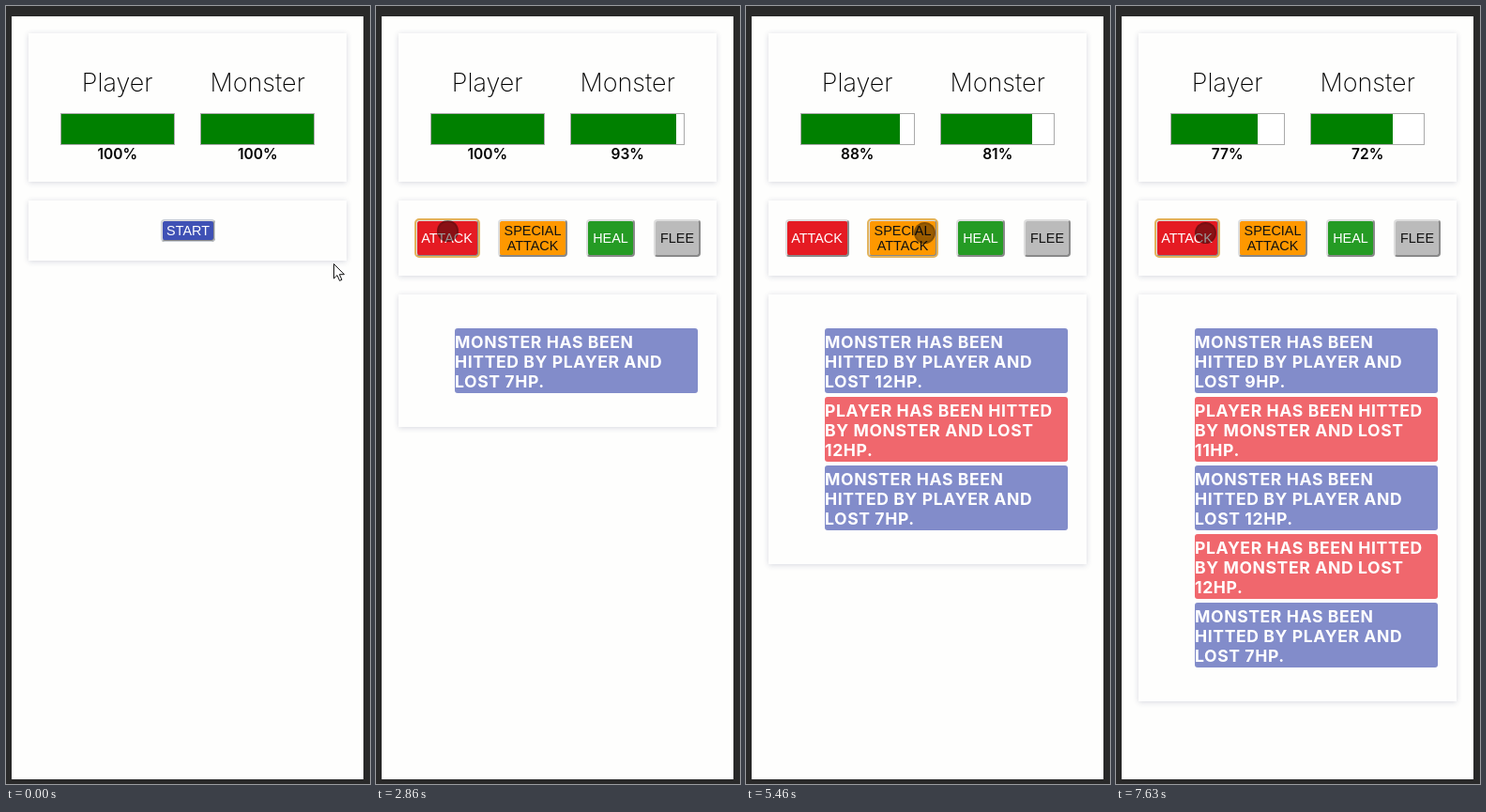
These frames come from a looping animation (388x828 px, 8000 ms). An HTML page:

```html
<!DOCTYPE html>
<html lang="en">
<head>
<meta charset="utf-8">
<style>
  html, body { margin: 0; width: 100%; height: 100%; overflow: hidden; background: #292929; }
  body { position: relative; font-family: Inter, sans-serif; color: #000; }
  div, button, svg { position: absolute; box-sizing: border-box; white-space: nowrap; }
  #page { left: 6px; top: 11px; width: 375px; height: 812px; background: #fefefd; }
  .card { left: 24px; width: 339px; background: #fefefd; box-shadow: 0 1px 6px rgba(40, 45, 90, .18); }
  .fighter { top: 62px; width: 122px; height: 110px; text-align: center; }
  .name { width: 100%; font-size: 27px; font-weight: 200; line-height: 39px; }
  .bar { top: 52px; width: 122px; height: 34px; border: 1px solid #aaa; background: #fff; }
  .fill { height: 100%; background: #008000; }
  .percent { top: 86px; width: 100%; font-size: 15.5px; font-weight: 600; line-height: 19px; }
  button {
    top: 227px; height: 40px; padding: 0; border: 2px outset #ddd; border-radius: 4px;
    font: 14.4px/16px "Liberation Sans", Arial, sans-serif; color: #fff;
  }
  button.focus { outline: 2px solid #e3b45c; outline-offset: -1px; }
  #start { left: 165px; width: 58px; height: 24px; background: #3f51b5; }
  #start.focus { outline: 1px solid #c9cfd6; }
  #attack { left: 41.5px; width: 68px; background: #e51b23; }
  #special { left: 130px; width: 74px; background: #ff9800; color: #111; }
  #heal { left: 224px; width: 52px; background: #259b24; }
  #flee { left: 296px; width: 50px; background: #bbb; color: #111; }
  .entry {
    left: 60px; width: 259px; height: 69px; padding: 4px 0 2px; border-radius: 3px;
    color: #fff; font-size: 17.6px; font-weight: 700; line-height: 21px; letter-spacing: .6px;
  }
  .monster { background: #828cca; }
  .player { background: #f0676d; }
  #touch {
    left: -11.5px; top: -11.5px; width: 23px; height: 23px; border-radius: 50%;
    background: rgba(0, 0, 0, .4); border: 2px solid rgba(0, 0, 0, .12);
  }
  #arrow { left: 348px; top: 273px; }
</style>
</head>
<body>
<div id="page"></div>
<div class="card" style="top:29px;height:158px"></div>
<div class="card" id="controls" style="top:207px"></div>
<div class="card" id="log" style="top:307px"></div>

<div class="fighter" style="left:57.7px">
  <div class="name">Player</div><div class="bar"><div class="fill"></div></div><div class="percent"></div>
</div>
<div class="fighter" style="left:207.2px">
  <div class="name">Monster</div><div class="bar"><div class="fill"></div></div><div class="percent"></div>
</div>

<button id="start">START</button>
<button id="attack" class="game">ATTACK</button>
<button id="special" class="game">SPECIAL<br>ATTACK</button>
<button id="heal" class="game">HEAL</button>
<button id="flee" class="game">FLEE</button>

<div id="touch"></div>
<svg id="arrow" width="14" height="21"><path d="M1.5 1.5V17L5 13.6 7.6 19.4 10 18.3 7.4 12.7H12.5Z" fill="#fff" stroke="#111"/></svg>

<script>
const LOOP = 8000, GAME_START = 1500;
const $ = id => document.getElementById(id);
const all = selector => [...document.querySelectorAll(selector)];

const hits = [
  { time: 2760, victim: 'monster', loss: 7 },
  { time: 3230, victim: 'player', loss: 12 },
  { time: 5460, victim: 'monster', loss: 12 },
  { time: 5960, victim: 'player', loss: 11 },
  { time: 7500, victim: 'monster', loss: 9 }
];

// [time, focused button]
const focusChanges = [[0, 'start'], [GAME_START, 'attack'], [5460, 'special'], [7500, 'attack']];

// [time, x, y]
const path = [
  [30, 347, 277], [130, 332, 273], [400, 255, 254], [620, 206, 243], [760, 196, 241],
  [1900, 196, 241], [1970, 222, 241], [2180, 92, 240], [2260, 76, 239],
  [4000, 76, 239], [4100, 82, 257], [4300, 112, 326], [4430, 133, 343],
  [4660, 161, 330], [4800, 169, 323], [4920, 186, 255], [4960, 190, 241],
  [6760, 190, 241], [6850, 174, 241], [7040, 106, 241], [7130, 95, 241]
];

const message = {
  monster: loss => `MONSTER HAS BEEN<br>HITTED BY PLAYER AND<br>LOST ${loss}HP.`,
  player: loss => `PLAYER HAS BEEN HITTED<br>BY MONSTER AND LOST<br>${loss}HP.`
};

function positionAt(t) {
  const next = path.findIndex(point => point[0] > t);
  if (next < 0) return path[path.length - 1].slice(1);
  if (next === 0) return path[0].slice(1);
  const [t0, x0, y0] = path[next - 1], [t1, x1, y1] = path[next];
  const k = (t - t0) / (t1 - t0);
  return [x0 + (x1 - x0) * k, y0 + (y1 - y0) * k];
}

let shownHits = -1;
function showHits(t) {
  const past = hits.filter(hit => hit.time <= t);
  if (past.length === shownHits) return;
  shownHits = past.length;
  ['player', 'monster'].forEach((who, i) => {
    const health = past.reduce((sum, hit) => sum - (hit.victim === who ? hit.loss : 0), 100);
    all('.fill')[i].style.width = all('.percent')[i].textContent = health + '%';
  });
  $('log').hidden = !past.length;
  $('log').style.height = 68 + 73 * past.length + 'px';
  $('log').innerHTML = past.reverse().map(({ victim, loss }, i) =>
    `<div class="entry ${victim}" style="top:${36 + 73 * i}px">${message[victim](loss)}</div>`).join('');
}

function draw(t) {
  const playing = t >= GAME_START;
  const focused = focusChanges.filter(change => change[0] <= t).pop()[1];
  $('controls').style.height = (playing ? 80 : 64) + 'px';
  $('start').hidden = playing;
  all('.game').forEach(button => button.hidden = !playing);
  all('button').forEach(button => button.classList.toggle('focus', button.id === focused));
  showHits(t);

  const [x, y] = positionAt(t);
  $('touch').style.transform = `translate(${x}px, ${y}px)`;
  $('touch').hidden = t < 30;
  $('arrow').style.display = t < 30 ? '' : 'none';
}

const origin = performance.now();
function tick() {
  draw(Math.max(0, performance.now() - origin) % LOOP);
  requestAnimationFrame(tick);
}
tick();
</script>
</body>
</html>
```
